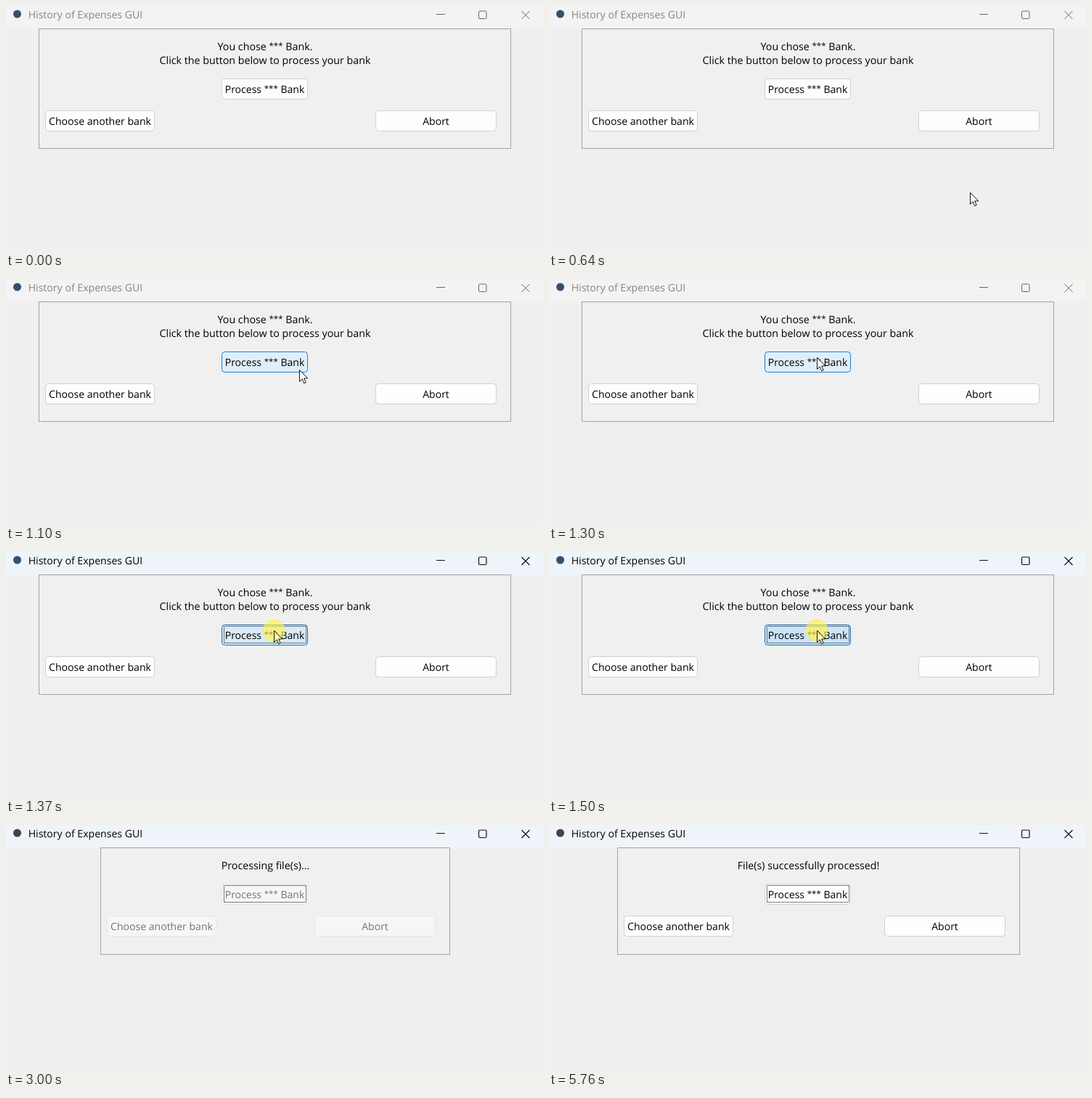
An HTML page for the animation above (8000 ms loop, 740 by 338 pixels).

```html
<!DOCTYPE html>
<html lang="en">
<head>
<meta charset="utf-8">
<title>History of Expenses GUI</title>
<style>
html, body { margin: 0; width: 100%; height: 100%; overflow: hidden; background: #efefef; }
svg { display: block; }
text { font: 14.25px "Open Sans", "Noto Sans", sans-serif; text-rendering: geometricPrecision; white-space: pre; }
.button { font-size: 14.05px; }
.title { font-size: 14.1px; }
.prompt { font-size: 23.6px; font-weight: 700; }
.star { font-size: 11.5px; }
</style>
</head>
<body>
<svg id="stage" width="740" height="338" viewBox="0 0 740 338"></svg>
<script>
const LOOP = 8000, STEP = 1000 / 15;
const MOVE = 500, PRESS = 1370, PROMPT = 2000, BUSY = 3000, DONE = 5760;
const FROM = [645, 315], TO = [369, 108];
const PRESS_FILLS = ['#d9eaf8', '#d2e7f8', '#cce4f7'];
const stage = document.getElementById('stage');

const label = (x, y, str, cls = '', fill = '#000') =>
  `<text class="${cls}" x="${x}" y="${y}" text-anchor="middle" fill="${fill}">${
    str.replace('***', '<tspan class="star" dy="-1.5">***</tspan><tspan dy="1.5">&#8203;</tspan>')}</text>`;

// Rectangle through pixel centres, given its first and last pixel
const box = (x0, y0, x1, y1, fill, stroke, extra = '') =>
  `<rect x="${x0 + .5}" y="${y0 + .5}" width="${x1 - x0}" height="${y1 - y0}" fill="${fill}" stroke="${stroke}" ${extra}/>`;

const STYLES = {
  normal: ['#fdfdfd', '#d0d0d0', '#000'],
  hover: ['#e0eef9', '#1680d8', '#000'],
  disabled: ['#f6f6f6', '#e6e6e6', '#757575'],
};

function button(x0, y0, x1, str, [fill, stroke, ink], focus) {
  const y1 = y0 + 28;
  const dots = focus
    ? box(x0 + 3, y0 + 2, x1 - 2, y1 - 3, 'none', '#000', 'stroke-dasharray="1 1" stroke-dashoffset=".5"') : '';
  return box(x0, y0, x1, y1, fill, stroke, 'rx="4"') + dots +
    label((x0 + x1 + 1) / 2, y0 + 19.5, str, 'button', ink);
}

function titleBar(active, icon) {
  const ink = active ? '#000' : '#858585';
  return `<rect width="740" height="32" fill="${active ? '#eef4f9' : '#f3f3f3'}"/>
    <circle cx="15.5" cy="11" r="5.5" fill="${icon}"/>
    <text class="title" x="30.7" y="17" fill="${ink}">History of Expenses GUI</text>
    <g fill="none" stroke="${active ? '#111' : '#666'}" stroke-width="${active ? 1.2 : 1}">
      <path d="M593 11.5h12M710.5 7l11 11m0-11l-11 11"/>
      <rect x="651.5" y="7" width="10.5" height="10.5" rx="1.5"/>
    </g>`;
}

const panel = (x0, x1, y1) => box(x0, 31, x1, y1, '#f0f0f0', '#a2a2a2');

const cursor = (x, y, fill) =>
  `<path transform="translate(${x} ${y})" d="M.5 .5v16l3.7-3.5 2.5 5.8 2.5-1.1-2.5-5.7h5.1z"
    fill="${fill}" stroke="#111" stroke-linejoin="round"/>`;

function chooseScene(t) {
  const pressed = t >= PRESS;
  let pointer = '', style = STYLES.normal;
  if (t >= MOVE) {
    const step = Math.min(12, Math.floor((t - MOVE + 4) / STEP));
    const left = 1 - step / 12;
    const x = Math.round(TO[0] + (FROM[0] - TO[0]) * left ** 1.48);
    const y = Math.round(TO[1] + (FROM[1] - TO[1]) * left ** 1.82);
    if (x >= 297 && x < 416 && y >= 100 && y < 129) style = STYLES.hover;
    pointer = cursor(x, y, pressed ? '#ffffa8' : '#fff');
    if (pressed) {
      const i = t < 1430 ? 0 : t < 1500 ? 1 : 2;
      style = [PRESS_FILLS[i], '#1d6cad', '#000'];
      pointer = '<circle cx="369" cy="108" r="15.5" fill="#fff34a" opacity=".65"/>' + pointer;
    }
  }
  return titleBar(pressed, '#34506e') + panel(45, 695, 196) +
    label(357, 60.5, 'You chose *** Bank.') +
    label(357, 79.5, 'Click the button below to process your bank') +
    button(297, 100, 415, 'Process *** Bank', style, pressed) +
    button(54, 144, 204, 'Choose another bank', STYLES.normal) +
    button(509, 144, 675, 'Abort', STYLES.normal) + pointer;
}

function resultScene(x0, x1, message, style) {
  return titleBar(true, '#444') + panel(x0, x1, 178) +
    label(357.5, 60.5, message) +
    button(297, 81, 415, 'Process *** Bank', style, true) +
    button(x0 + 9, 125, x0 + 159, 'Choose another bank', style) +
    button(x1 - 186, 125, x1 - 20, 'Abort', style);
}

function scene(t) {
  if (t < PROMPT) return chooseScene(t);
  if (t < BUSY) return label(370, 176, 'Prompt for file selection', 'prompt') +
    '<path d="M0 337.5h640" stroke="#e0e0e0"/>';
  if (t < DONE) return resultScene(130, 611, 'Processing file(s)...', STYLES.disabled);
  return resultScene(94, 648, 'File(s) successfully processed!', STYLES.normal);
}

let shown = '';
const start = performance.now();
function frame() {
  const markup = scene((performance.now() - start) % LOOP);
  if (markup !== shown) stage.innerHTML = shown = markup;
  requestAnimationFrame(frame);
}
frame();
</script>
</body>
</html>
```
